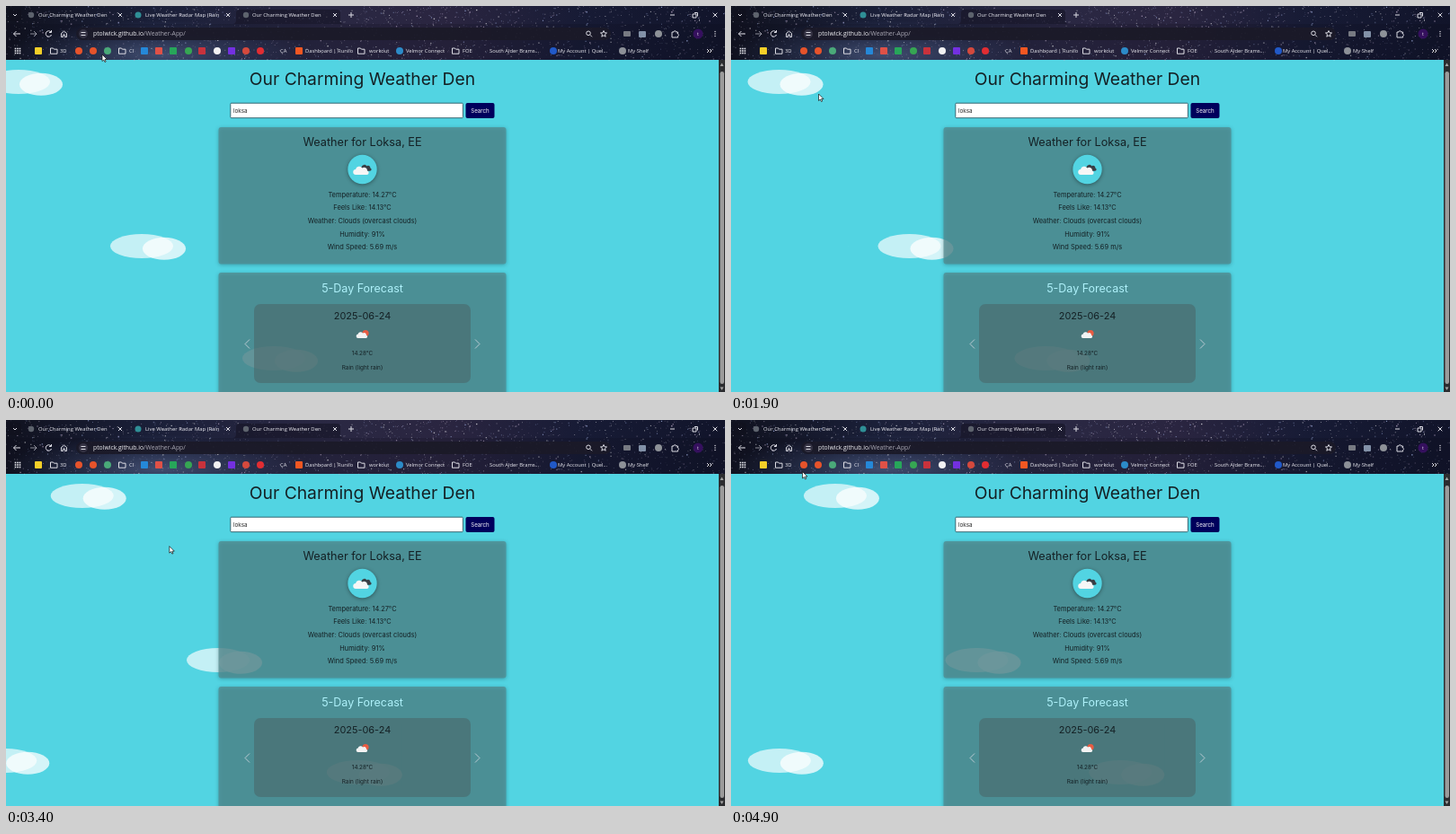
Recreate the animation shown at these times as an HTML page. Size 800 px wide and 430 px high, loop 5000 ms.

```html
<!DOCTYPE html>
<html lang="en">
<head>
<meta charset="utf-8">
<title>Weather</title>
<style>
html, body { margin: 0; width: 100%; height: 100%; overflow: hidden; background: #52d4e2 }
svg { display: block; width: 800px; height: 430px }
.ui { font-family: "Open Sans", "Noto Sans", sans-serif }
.page { font-family: Inter, "Open Sans", sans-serif }
.line { fill: none; stroke: #dcdce4; stroke-width: 1 }
.card { fill: rgb(83, 136, 140); fill-opacity: .72; filter: drop-shadow(0 1px 2px rgba(0, 30, 40, .4)) }
</style>
</head>
<body>
<svg viewBox="0 0 800 430">
  <defs>
    <linearGradient id="night">
      <stop offset="0" stop-color="#10121f"/><stop offset=".2" stop-color="#1a1f38"/>
      <stop offset=".45" stop-color="#2a2843"/><stop offset=".62" stop-color="#2a2540"/>
      <stop offset=".8" stop-color="#171b35"/><stop offset="1" stop-color="#11142a"/>
    </linearGradient>
    <radialGradient id="glow">
      <stop offset="0" stop-color="#7088b8" stop-opacity=".6"/><stop offset="1" stop-color="#506499" stop-opacity="0"/>
    </radialGradient>
    <g id="cloud" fill="#fff">
      <ellipse cx="35" cy="13.500" rx="35" ry="13.500" opacity=".66"/>
      <ellipse cx="60" cy="16.300" rx="24" ry="12.500" opacity=".75"/>
    </g>
    <path id="puff" d="M-6 4a3 3 0 0 1-.5-6 4.200 4.200 0 0 1 7.500-1.500A3.500 3.500 0 0 1 6.500-.5 2.300 2.300 0 0 1 6 4z"/>
    <clipPath id="view"><rect y="60" width="793" height="370"/></clipPath>
    <clipPath id="top"><rect width="800" height="60"/></clipPath>
  </defs>
  <rect width="800" height="430" fill="#52d4e2"/>
  <g id="sky" clip-path="url(#view)"></g>
  <g id="page" class="page" clip-path="url(#view)"></g>
  <g id="chrome" class="ui"></g>
  <path id="cursor" d="M0 0V7.500L1.800 6 3 8.500 4.200 8 3 5.500H5.500Z" fill="#fff" stroke="#111" stroke-width=".7"/>
</svg>
<script>
const $ = id => document.getElementById(id);
const text = (x, y, size, s, fill, extra = '') =>
  `<text x="${x}" y="${y}" font-size="${size}" fill="${fill}" ${extra}>${s}</text>`;
const mid = (y, size, s, fill = '#142024') => text(396.5, y, size, s, fill, 'text-anchor="middle"');
const rect = (x, y, w, h, fill, r = 0, extra = '') =>
  `<rect x="${x}" y="${y}" width="${w}" height="${h}" rx="${r}" fill="${fill}" ${extra}/>`;
const dot = (x, y, r, fill, extra = '') => `<circle cx="${x}" cy="${y}" r="${r}" fill="${fill}" ${extra}/>`;
const line = (d, extra = '') => `<path class="line" d="${d}" ${extra}/>`;
const puff = (x, y, k, fill) =>
  `<use href="#puff" transform="translate(${x} ${y}) scale(${k})" fill="${fill}"/>`;
const cross = (x, y, r = 2) => line(`M${x - r} ${y - r}l${2 * r} ${2 * r}m0-${2 * r}l-${2 * r} ${2 * r}`, 'stroke-width=".8"');
const folder = x => line(`M${x - 3.5} 47h3l1 1.200h3.500v5h-7.500z`, 'stroke-width=".8"');

let seed = 11;
const rnd = () => (seed = seed * 16807 % 2147483647) / 2147483647;

function stars() {
  let out = '';
  for (let i = 0; i < 1800; i++) {
    const x = rnd() * 800, y = rnd() * 60, s = .5 + rnd() * rnd() * 1.1;
    const tint = ['#fff', '#a9b9ea', '#c3b0cf'][i % 3];
    out += rect(x.toFixed(1), y.toFixed(1), s.toFixed(2), s.toFixed(2), tint, 0, `opacity="${(.2 + rnd() * .6).toFixed(2)}"`);
  }
  return out;
}

function browser() {
  const ink = '#ececf2', title = 'Our Charming Weather Den';
  let out = rect(0, 0, 800, 60, 'url(#night)');
  out += '<ellipse cx="170" cy="54" rx="170" ry="38" fill="url(#glow)" clip-path="url(#top)"/>' + stars();
  out += rect(0, 20, 800, 40, '#0c0d1a', 0, 'opacity=".2"');
  // tabs and window buttons
  out += rect(3, 3, 14, 14, '#10111e', 4, 'opacity=".8"') + line('M8 9l2 2 2-2');
  out += `<path d="M252 20q4 0 4-4v-8q0-4 4-4h108q4 0 4 4v8q0 4 4 4z" fill="#171629" opacity=".7"/>`;
  for (const x of [28, 267]) out += dot(x, 10, 3.2, '#5d636d');
  out += dot(147, 10, 3.5, '#2f8f96');
  out += text(36, 12.3, 5.9, title, ink) + text(155, 12.3, 5.9, 'Live Weather Radar Map (Rain', ink) +
    text(274, 12.3, 5.9, title, ink);
  for (const x of [127, 247, 366]) out += cross(x, 10);
  out += line('M381 10h6M384 7v6') + line('M739 10h5', 'stroke-width=".8"') +
    line('M764 9h4v4h-4zM766 7.500h3.500v4', 'stroke-width=".7"') + cross(789, 10, 2.3);
  // toolbar
  out += line('M16 31H8.500m3-3l-3 3 3 3') + line('M27 31h7m-3-3l3 3-3 3', 'opacity=".6"') +
    line('M50 29a3.200 3.200 0 1 0 .5 3M50.500 27v2.500h-2.500') + line('M61.500 30.500l3-2.500 3 2.500v4h-2v-2.500h-2v2.500h-2z');
  out += rect(78, 24, 595, 14, '#1b1928', 7, 'opacity=".92"') + dot(86, 31, 5, '#353344');
  out += line('M83.500 29.500h5M83.500 32.500h5', 'stroke-width=".8"');
  out += text(97, 33.2, 6.8, 'ptolwick.github.io<tspan fill="#aaa9b4">/Weather-App/</tspan>', '#f0f0f4');
  out += `<circle class="line" cx="648" cy="30.300" r="2.300"/>` + line('M650 32.300l2 2');
  out += line('M665 27.500l1 2.300 2.500.2-2 1.700.7 2.500-2.200-1.400-2.200 1.400.7-2.500-2-1.700 2.500-.2z', 'stroke-width=".7"');
  out += rect(687, 28, 8, 6, '#777a82', 1) + rect(704, 28, 8, 7, '#8291a8', 1) + dot(726, 31, 4, '#8e9298');
  out += line('M741 29h2a1.300 1.300 0 0 1 2.600 0h2v2.200a1.200 1.200 0 0 1 0 2.300v1.500H741z');
  out += dot(770, 31, 5.5, '#35105e') + text(769, 33, 5, 't', ink);
  for (const y of [28.5, 31, 33.5]) out += dot(789, y, .7, ink);
  // bookmarks
  for (let i = 0; i < 9; i++)
    out += rect(9.7 + i % 3 * 2.5, 46.7 + Math.floor(i / 3) * 2.5, 1.6, 1.6, ink);
  [53, 129, 395, 500].forEach(x => out += folder(x));
  [[36, '#f4cf28'], [154, '#2588d8'], [170, '#df5147'], [186, '#27a65a'], [218, '#c8323c'], [251, '#7330e0'],
   [326, '#f25722']].forEach(([x, c]) => out += rect(x - 4, 46, 8, 8, c, 1));
  [[81, '#e6532b'], [97, '#e6532b'], [113, '#4aa979'], [203, '#36a653'], [235, '#f1f1f3'], [267, '#d4493d'],
   [283, '#e22d32'], [438, '#2c8bc8'], [609, '#2159c8'], [686, '#8d9198']]
    .forEach(([x, c]) => out += dot(x, 50, 4, c));
  [[60, '3D'], [137, 'CI'], [305, 'ÇA'], [333, 'Dashboard | Runilo'], [404, 'workout'], [445, 'Velmor Connect'],
   [508, 'FOE'], [538, 'South Alder Brams...'], [614, 'My Account | Quel...'], [692, 'My Shelf']]
    .forEach(([x, s]) => out += text(x, 52.2, 5.8, s, ink));
  out += line('M780 48l2 2-2 2m3-4l2 2-2 2', 'stroke-width=".8"');
  // scrollbar
  return out + rect(793, 60, 7, 370, '#2b2c2f') + rect(794.5, 73, 4.5, 348, '#9b9b9b', 2.2) +
    `<path d="M794.500 67l2-3.500 2 3.500zM794.500 424.500l2 3.500 2-3.500z" fill="#a5a5a5"/>`;
}

function page() {
  let out = mid(87.5, 19.3, 'Our Charming Weather Den');
  out += rect(249.8, 108.2, 258.6, 16.5, '#fff', 1, 'stroke="#2c5a66" stroke-width=".9"') + text(253, 119, 6.3, 'loksa', '#222');
  out += rect(511.5, 108, 32, 17, '#00005c', 2) + text(527.5, 119, 6.2, 'Search', '#fff', 'text-anchor="middle"');
  out += rect(236.5, 135, 320, 152.5, '', 3, 'class="card"') + rect(236.5, 297, 320, 150, '', 3, 'class="card"');
  out += mid(156, 12.7, 'Weather for Loksa, EE');
  out += dot(396.5, 182, 16.2, '#52d4e2', 'style="filter:drop-shadow(0 1px 2px #0006)"') +
    puff(400.5, 180.8, .75, '#393f45') + puff(395.5, 184, 1, '#f6f6f6');
  ['Temperature: 14.27°C', 'Feels Like: 14.13°C', 'Weather: Clouds (overcast clouds)', 'Humidity: 91%', 'Wind Speed: 5.69 m/s']
    .forEach((s, i) => out += mid(212.5 + i * 14.7, 7.45, s));
  out += mid(318.5, 12.5, '5-Day Forecast', '#aef1fa');
  out += rect(276, 332, 241, 88, '#496467', 7, 'opacity=".55"');
  out += mid(348.5, 10.9, '2025-06-24');
  out += dot(400, 364.5, 3.6, '#e85c42') + puff(396.3, 367, .72, '#f3f3f3');
  out += mid(388.5, 6.3, '14.28°C') + mid(404.8, 6.4, 'Rain (light rain)');
  return out + line('M271 371.500l-5 5 5 5', 'opacity=".75"') + line('M522 371.500l5 5-5 5', 'opacity=".75"');
}

// x at the start, y, speed in px/s
const clouds = [[-21, 71, 20.8], [116, 254, 25], [263, 379, 27.6], [-159.5, 366, 36.4]];
// time in s, x, y
const moves = [[0, 107, 54], [.6, 345, 60], [1.2, 480, -15], [1.6, 90, -15], [1.9, 97.5, 98],
  [2.9, 168.5, 207], [3.8, 192.5, 87.5], [4.9, 79.5, 57.5], [5, 79.5, 57.5]];

$('sky').innerHTML = '<use href="#cloud"/>'.repeat(clouds.length);
$('page').innerHTML = page();
$('chrome').innerHTML = browser();
const place = (el, x, y) => el.setAttribute('transform', `translate(${x} ${y})`);

function draw(now) {
  const t = Math.floor(now % 5000 / 100) / 10;
  clouds.forEach(([x, y, v], i) => place($('sky').children[i], x + v * t, y));
  const i = moves.findIndex(m => m[0] > t), [t0, x0, y0] = moves[i - 1], [t1, x1, y1] = moves[i];
  const k = (t - t0) / (t1 - t0);
  place($('cursor'), x0 + (x1 - x0) * k, y0 + (y1 - y0) * k);
  requestAnimationFrame(draw);
}
draw(performance.now());
</script>
</body>
</html>
```
